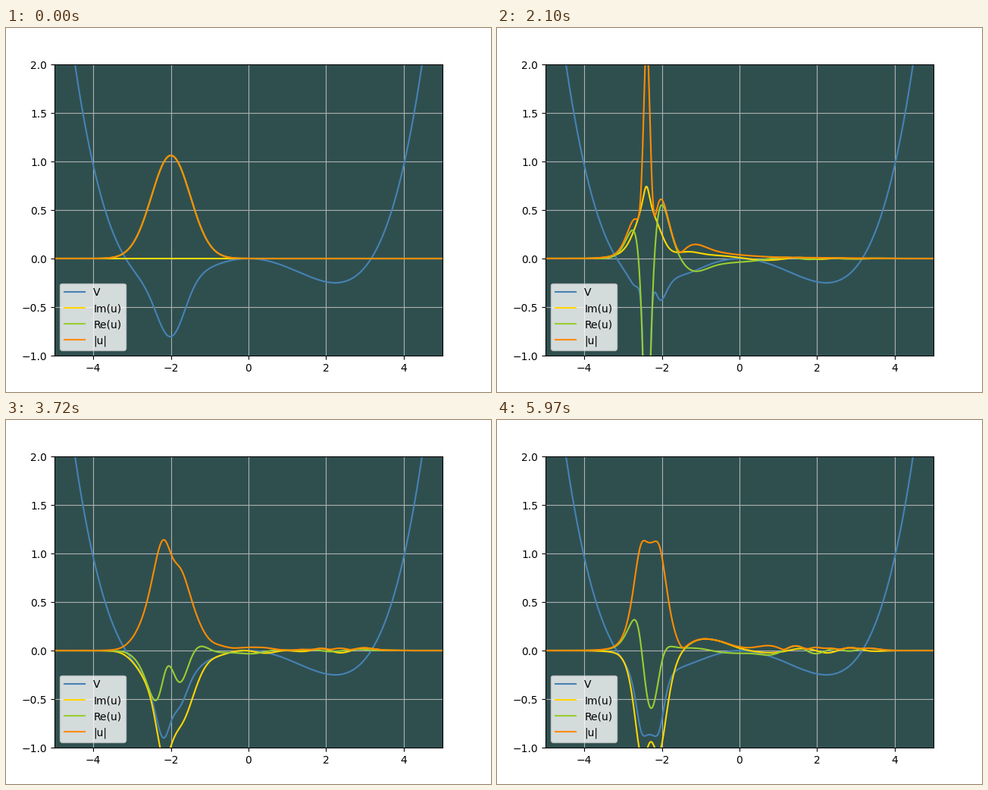
A matplotlib script for the animation above (6 s loop, 640x480 px).

```python
import numpy as np
import matplotlib.pyplot as plt
from matplotlib.animation import FuncAnimation

FRAMES, INTERVAL = 200, 30
T_END, SUBSTEPS = 99.0, 50
KINETIC, COUPLING = 0.01, 0.5

# Periodic grid, slightly wider than the visible range
L, N = 6.0, 640
x = np.linspace(-L, L, N, endpoint=False)
k = 2 * np.pi * np.fft.fftfreq(N, d=2 * L / N)
well = 0.01 * x**4 - 0.1 * x**2


def potential(u):
    return well - COUPLING * np.abs(u)**2


def evolve():
    """Split-step solution of i u_t = -KINETIC u_xx + V(u) u."""
    dt = T_END / (FRAMES - 1) / SUBSTEPS
    drift = np.exp(-1j * KINETIC * k**2 * dt)
    u = (4 / np.pi)**0.25 * np.exp(-2 * (x + 2)**2) + 0j
    states = [u]
    for _ in range(FRAMES - 1):
        for _ in range(SUBSTEPS):
            u = u * np.exp(-0.5j * dt * potential(u))
            u = np.fft.ifft(drift * np.fft.fft(u))
            u = u * np.exp(-0.5j * dt * potential(u))
        states.append(u)
    return states


states = evolve()

fig = plt.figure(figsize=(6.4, 4.8), dpi=100)
ax = fig.add_axes([0.1, 0.1, 0.8, 0.8])
ax.set_facecolor("darkslategray")
ax.set_xlim(-5, 5)
ax.set_ylim(-1, 2)
ax.grid(True)

curves = [
    ("V", "steelblue", potential),
    ("Im(u)", "gold", np.imag),
    ("Re(u)", "yellowgreen", np.real),
    ("|u|", "darkorange", np.abs),
]
lines = [ax.plot([], [], color=color, label=label)[0]
         for label, color, _ in curves]
ax.legend(loc="lower left")


def update(frame):
    for line, (_, _, value) in zip(lines, curves):
        line.set_data(x, value(states[frame]))
    return lines


anim = FuncAnimation(fig, update, frames=FRAMES, interval=INTERVAL,
                     repeat=True, repeat_delay=0)
plt.show()
```
